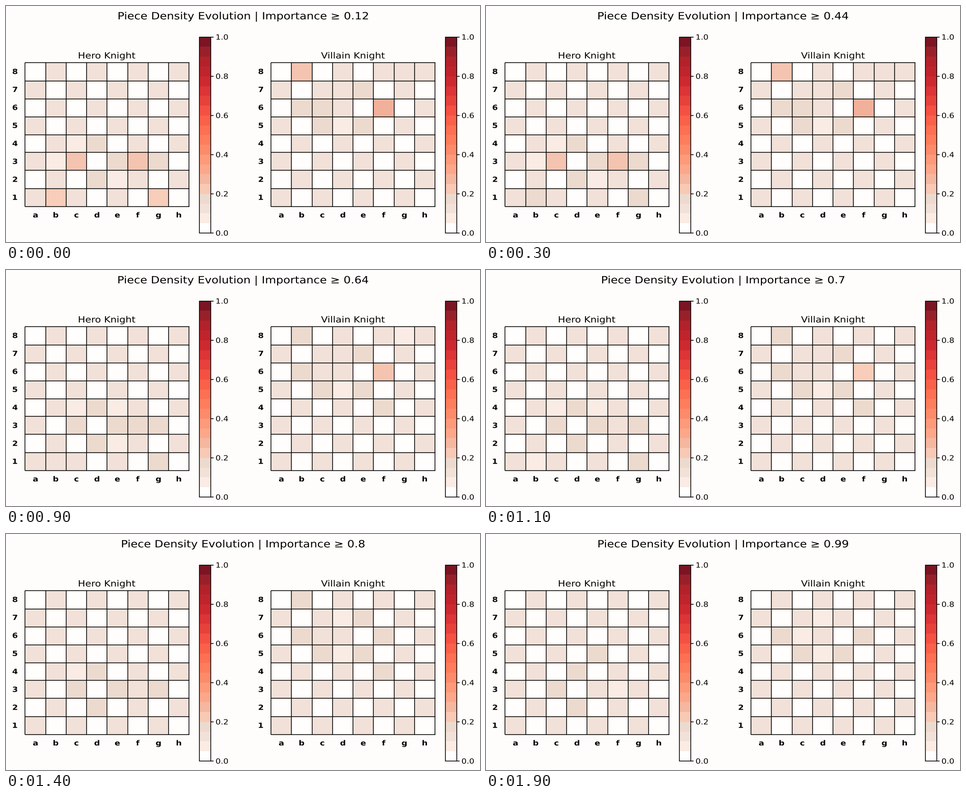
Animation, 1000 px wide and 500 px high, one loop 2 s. Source, as a matplotlib script:

```python
import numpy as np
import matplotlib.pyplot as plt
from matplotlib.animation import FuncAnimation
from matplotlib.colors import ListedColormap
from matplotlib.patches import PathPatch, Rectangle
from matplotlib.textpath import TextPath
from matplotlib.transforms import Affine2D

# Scene units: square cells, the view fills the whole stage.
VIEW_W, VIEW_H = 881, 500
BOARD_X, BOARD_Y, SIDE = 35.55, 120.23, 304.76
BAR_X, BAR_Y, BAR_W, BAR_H = 359.54, 65.7, 21.0, 415.3
PANEL_STEP = 457.02
RASTER = 1.0903
BG, INK = "#fefdfb", "#000000"
LINE_W = 1.12

THRESHOLDS = [0.12, 0.3, 0.4, 0.44, 0.48, 0.52, 0.55, 0.58, 0.61, 0.64,
              0.67, 0.7, 0.73, 0.77, 0.8, 0.83, 0.87, 0.91, 0.95, 0.99]

# Cell shades from empty to hot
LEVELS = "-FDPhHsS"
SHADES = ListedColormap(["#fffefd", "#faece5", "#f2e1d8", "#ecdacf",
                         "#f8cdb9", "#f5c4b1", "#f4bda6", "#f1b09a"])

BAR_COLORS = ["#fffefe", "#faece5", "#f2e1d8", "#ecdacf", "#f8c9b5",
              "#f5b7a0", "#fda78a", "#fd9a7b", "#fc8b6a", "#fd7d5d",
              "#fd7052", "#f96149", "#f45143", "#e8413c", "#dc3437",
              "#cd2930", "#bf242d", "#b2222b", "#98202a", "#7b1524"]

# Square -> steps of (first frame, level)
HERO = {
    "e5": [(18, "P")],
    "c4": [(0, "F"), (17, "-")],
    "d4": [(0, "P")],
    "e4": [(4, "F"), (13, "-")],
    "b3": [(0, "F"), (8, "-")],
    "c3": [(0, "H"), (4, "h"), (8, "P")],
    "e3": [(0, "P"), (17, "D")],
    "f3": [(0, "H"), (4, "h"), (7, "P"), (10, "D"), (17, "F")],
    "g3": [(0, "P"), (17, "D")],
    "d2": [(0, "P")],
    "e2": [(0, "F"), (10, "-")],
    "b1": [(0, "h"), (1, "P"), (4, "D"), (10, "F"), (13, "-")],
    "g1": [(0, "h"), (1, "P"), (13, "D")],
}
VILLAIN = {
    "b8": [(0, "H"), (4, "P"), (17, "D")],
    "g8": [(0, "D"), (4, "F"), (10, "-")],
    "d7": [(0, "D"), (13, "F")],
    "e7": [(0, "P"), (19, "D")],
    "b6": [(0, "P")],
    "c6": [(0, "P"), (4, "D"), (17, "F")],
    "f6": [(0, "S"), (4, "s"), (7, "H"), (11, "h"), (13, "P")],
    "c5": [(0, "P")],
    "d5": [(0, "F")],
    "e5": [(0, "P")],
    "f4": [(4, "P"), (17, "D")],
}


def board_levels(steps, frame):
    """Level index of each square, rank 8 first."""
    rank, file = np.indices((8, 8))
    grid = np.where((rank + file) % 2, LEVELS.index("D"), 0)
    for square, changes in steps.items():
        col, row = "abcdefgh".index(square[0]), 8 - int(square[1])
        for start, level in changes:
            if frame >= start:
                grid[row, col] = LEVELS.index(level)
    return grid


def text_path(x, base, text, size, weight="normal", ha="center"):
    path = TextPath((0, 0), text, size=size,
                    prop={"family": "DejaVu Sans", "weight": weight})
    if ha == "center":
        box = path.get_extents()
        x -= (box.x0 + box.x1) / 2
    return Affine2D().scale(1, -1).translate(x, base).transform_path(path)


def label(*args, **kwargs):
    patch = PathPatch(text_path(*args, **kwargs), fc=INK, lw=0)
    ax.add_patch(patch)
    return patch


def draw_line(xs, ys):
    ax.plot(xs, ys, color=INK, lw=LINE_W, solid_capstyle="butt")


def draw_bar(x):
    edges = np.linspace(BAR_Y + BAR_H, BAR_Y, len(BAR_COLORS) + 1)
    ax.pcolormesh([x, x + BAR_W], edges,
                  np.arange(len(BAR_COLORS))[:, None],
                  cmap=ListedColormap(BAR_COLORS))
    ax.add_patch(Rectangle((x, BAR_Y), BAR_W, BAR_H, fill=False,
                           ec=INK, lw=LINE_W, zorder=3))
    for i in range(6):
        y = BAR_Y + BAR_H * (1 - i / 5)
        draw_line([x + BAR_W, x + BAR_W + 5.3], [y, y])
        label(x + BAR_W + 8.9, y + 5.5, f"{i / 5:.1f}", 15.1, ha="left")


def draw_panel(dx, name, steps):
    x0, cell = BOARD_X + dx, SIDE / 8
    xs = x0 + cell * np.arange(9)
    rows = BOARD_Y + cell * np.arange(9)
    # Rows settle on the centres of a slightly coarse raster.
    ys = (np.floor(rows / RASTER) + 0.5) * RASTER
    mesh = ax.pcolormesh(xs, ys, board_levels(steps, 0), cmap=SHADES,
                         vmin=0, vmax=len(LEVELS) - 1)
    for x, y in zip(xs, ys):
        draw_line([x, x], [ys[0] - 0.5, ys[-1] + 0.5])
        draw_line([xs[0] - 0.5, xs[-1] + 0.5], [y, y])
    for i in range(8):
        label(xs[i] + cell / 2, 448, "abcdefgh"[i], 15.1, "bold")
        label(x0 - 18.8, rows[i] + cell / 2 + 4.8, str(8 - i), 15.1, "bold")
    label(x0 + SIDE / 2 - 0.1, 111.2, name, 18.1)
    draw_bar(BAR_X + dx)
    return mesh


def title_path(frame):
    text = f"Piece Density Evolution | Importance ≥ {THRESHOLDS[frame]}"
    return text_path(VIEW_W / 2 + 0.5, 28.3, text, 21.12)


def update(frame):
    title.set_path(title_path(frame))
    for mesh, steps in boards:
        mesh.set_array(board_levels(steps, frame))
    return [title] + [mesh for mesh, _ in boards]


fig = plt.figure(figsize=(10, 5), dpi=100, facecolor=BG)
ax = fig.add_axes([0, 0, 1, 1])
boards = [(draw_panel(0, "Hero Knight", HERO), HERO),
          (draw_panel(PANEL_STEP, "Villain Knight", VILLAIN), VILLAIN)]
title = PathPatch(title_path(0), fc=INK, lw=0)
ax.add_patch(title)
ax.set(xlim=(0, VIEW_W), ylim=(VIEW_H, 0))
ax.axis("off")

anim = FuncAnimation(fig, update, frames=len(THRESHOLDS), interval=100,
                     init_func=lambda: update(0), repeat=True, repeat_delay=0)
plt.show()
```
